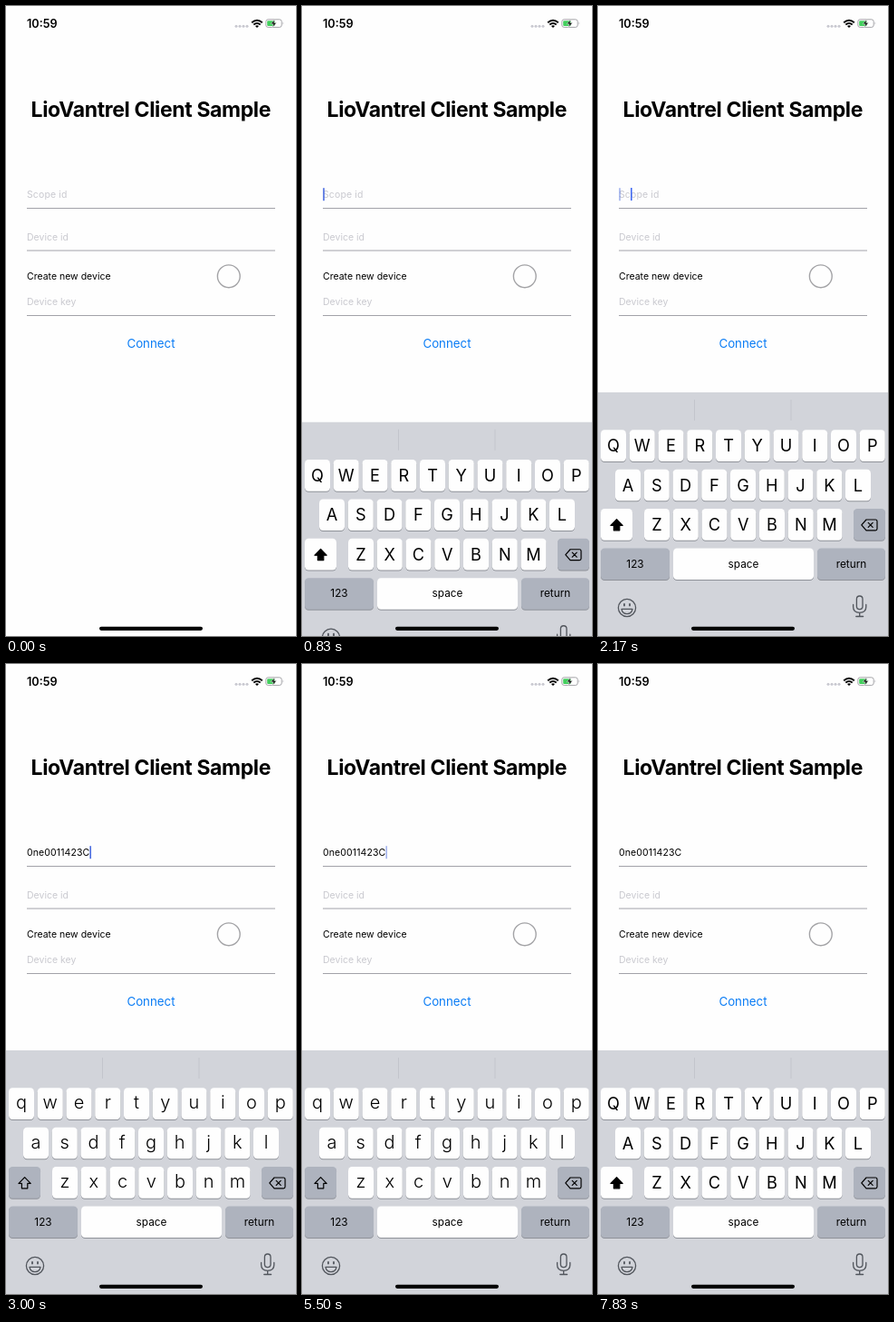
An HTML page that plays this animation: 320x693 px, repeating every 8 s.

```html
<!DOCTYPE html>
<html lang="en">
<head>
<meta charset="utf-8">
<title>Client sample</title>
<style>
  html, body { margin: 0; width: 100%; height: 100%; overflow: hidden; background: #fefefe; }
  svg { display: block; width: 100vw; height: 100vh; font-family: Inter, "Liberation Sans", sans-serif; }
  .mid { text-anchor: middle; }
  .title { font-size: 23px; font-weight: 700; letter-spacing: -.36px; }
  .field { font-size: 10.5px; }
  .hint { fill: #c9c9cf; }
  .rule { stroke: #a2a2a9; }
  .label { font-size: 11.8px; }
  .light { fill: #fefefe; }
  .dark { fill: #aeb3be; }
  .icon { fill: none; stroke: #51555c; stroke-width: 1.3; stroke-linecap: round; stroke-linejoin: round; }
  .glyph { fill: none; stroke: #000; stroke-width: 1.2; stroke-linecap: round; stroke-linejoin: round; }
</style>
</head>
<body>
<svg viewBox="0 0 320 693" preserveAspectRatio="none">
  <rect width="320" height="693" fill="#fefefe"/>

  <text x="23" y="24" font-size="12.7" font-weight="600">10:59</text>
  <g fill="#c8c8d0">
    <circle cx="254" cy="22.3" r="1.5"/><circle cx="258" cy="22.3" r="1.5"/>
    <circle cx="262" cy="22.3" r="1.5"/><circle cx="266" cy="22.3" r="1.5"/>
  </g>
  <g fill="none" stroke="#000" stroke-width="1.9">
    <path d="M271.2 18.2q5.8-5 11.6 0M273.3 20.6q3.7-3 7.4 0"/>
    <path d="M275 21.9q2-1.4 4 0L277 24Z" fill="#000" stroke="none"/>
  </g>
  <rect x="286.8" y="14.8" width="17.4" height="8.6" rx="2.4" fill="none" stroke="#a5a5a9"/>
  <rect x="288.2" y="16.2" width="8.6" height="5.8" rx="1.2" fill="#41cf5c"/>
  <path d="M305.6 17.6q1.6 1.5 0 3z" fill="#a5a5a9"/>
  <path d="M296.6 14.8l-4.4 5h2.8l-1 3.8 4.6-5.2h-2.9z" stroke="#fefefe" stroke-width=".5"/>

  <text class="title mid" x="159.8" y="122">LioVantrel Client Sample</text>

  <text id="scope" class="field" x="23" y="211.4" letter-spacing=".12"></text>
  <text class="field hint" x="23" y="257.6">Device id</text>
  <text class="field" x="23" y="300.9">Create new device</text>
  <text class="field hint" x="23" y="328.8">Device key</text>
  <path class="rule" d="M23 222.5H297M23 269H297M23 340.5H297"/>
  <circle cx="245.8" cy="297.3" r="12.4" fill="none" stroke="#a3a3a6" stroke-width="1.4"/>
  <text class="mid" x="160" y="375.9" font-size="13.3" fill="#0a7cf5">Connect</text>

  <rect id="caret" width="1.6" height="14" fill="#4a6ce0"/>
  <rect id="drag" fill="#426bf2"/>

  <g id="board">
    <rect width="320" height="270" fill="#d2d4da"/>
    <path d="M106.5 8V31M213 8V31" stroke="#c3c5cc"/>
    <g id="keys"></g>
    <g class="icon">
      <circle cx="32" cy="237" r="9.6"/>
      <path d="M26 238.4H38Q37.2 243.6 32 243.6T26 238.4Z"/>
      <path d="M29 232.8v1.8M35 232.8v1.8" stroke-width="1.8"/>
      <rect x="285.4" y="224" width="6.6" height="14.6" rx="3.3"/>
      <path d="M281.6 233.5v2.6q0 6.2 7.1 6.2t7.1-6.2v-2.6M288.7 242.3v4.2M284.8 246.5h7.8"/>
    </g>
  </g>

  <rect x="103" y="682.7" width="114" height="4.2" rx="2.1"/>
</svg>
<script>
const LOOP = 8000, TOP = 425, HEIGHT = 268;
const FOCUS = 1170, PASTE = 3000, SWITCH = 7000, BLUR = 7500;
const $ = id => document.getElementById(id);

function add(tag, attrs, text = '') {
  const node = document.createElementNS('http://www.w3.org/2000/svg', tag);
  set(node, attrs);
  node.textContent = text;
  $('keys').append(node);
  return node;
}

function set(node, attrs) {
  for (const name in attrs) node.setAttribute(name, attrs[name]);
}

function key(x, y, width, tone) {
  const box = { x, width, height: 34.6, rx: 4.2 };
  add('rect', { ...box, y: y + 1, fill: '#8f9299' });
  return add('rect', { ...box, y, class: tone });
}

// Letter rows
const letters = [];
[['QWERTYUIOP', 3], ['ASDFGHJKL', 19], ['ZXCVBNM', 51]].forEach(([row, left], r) => {
  [...row].forEach((char, i) => {
    const x = left + i * 31.75, y = 41.3 + r * 43.4;
    key(x, y, 28, 'light');
    letters.push({ char, y, node: add('text', { x: x + 14, class: 'mid' }) });
  });
});

// Function keys
const shift = key(3, 128.1, 35, 'light');
const arrow = add('path', { class: 'glyph', d: 'M20.6 139.6L27.2 146.4H23.8V151.8H17.4V146.4H14Z' });
key(282, 128.1, 35, 'dark');
add('path', {
  class: 'glyph',
  d: 'M296 140H306.2Q308 140 308 141.8V150Q308 151.8 306.2 151.8H296L290.8 145.9ZM298.2 143.4l5 5m0-5l-5 5'
});
[['123', 3, 76, 'dark'], ['space', 83, 155, 'light'], ['return', 242, 75, 'dark']].forEach(([name, x, width, tone]) => {
  key(x, 171.5, width, tone);
  add('text', { x: x + width / 2, y: 192.6, class: 'label mid' }, name);
});

function setCase(upper) {
  for (const { char, y, node } of letters) {
    node.textContent = upper ? char : char.toLowerCase();
    set(node, {
      y: y + (upper ? 24 : 23),
      'font-size': upper ? 18.2 : 20,
      'font-weight': upper ? 400 : 300
    });
  }
  shift.setAttribute('class', upper ? 'light' : 'dark');
  arrow.style.fill = upper ? '#000' : 'none';
}

// Six pictures a second
function snap(t) {
  const rest = t % 500;
  return t - rest + (rest >= 330 ? 330 : rest >= 170 ? 170 : 0);
}

// Remaining part of a critically damped slide
function slide(t) {
  const u = Math.max(0, t - 621) * .0174;
  return (1 + u) * Math.exp(-u);
}

let shown = -1, wasUpper;

function draw(t) {
  const pasted = t >= PASTE, next = t >= SWITCH, upper = !pasted || next;
  $('board').setAttribute('transform', `translate(0 ${TOP + HEIGHT * slide(t)})`);
  if (upper !== wasUpper) setCase(wasUpper = upper);

  const scope = $('scope');
  scope.textContent = pasted ? '0ne0011423C' : 'Scope id';
  scope.classList.toggle('hint', !pasted);

  // The blink restarts with every edit
  const pressed = t >= 670 && t < 830, dragging = t >= 2000 && t < 2500;
  const beat = (t - (next ? SWITCH : pasted ? PASTE : FOCUS)) % 1000;
  const dim = dragging || (beat >= 500 && beat < 830);
  const end = pasted && !next ? 23 + scope.getComputedTextLength() : 23.2;
  set($('caret'), {
    x: end,
    y: next ? 246.6 : 200.2,
    opacity: t < 830 || t >= BLUR ? 0 : dim ? .5 : 1
  });
  set($('drag'), {
    x: pressed ? 41.2 : 36,
    y: pressed ? 193.5 : 200,
    width: pressed ? 2.4 : 1.6,
    height: pressed ? 26 : 14,
    opacity: pressed || dragging ? 1 : 0
  });
}

const start = performance.now();

function tick() {
  const t = snap((performance.now() - start) % LOOP);
  if (t !== shown) draw(shown = t);
  requestAnimationFrame(tick);
}
tick();
</script>
</body>
</html>
```
